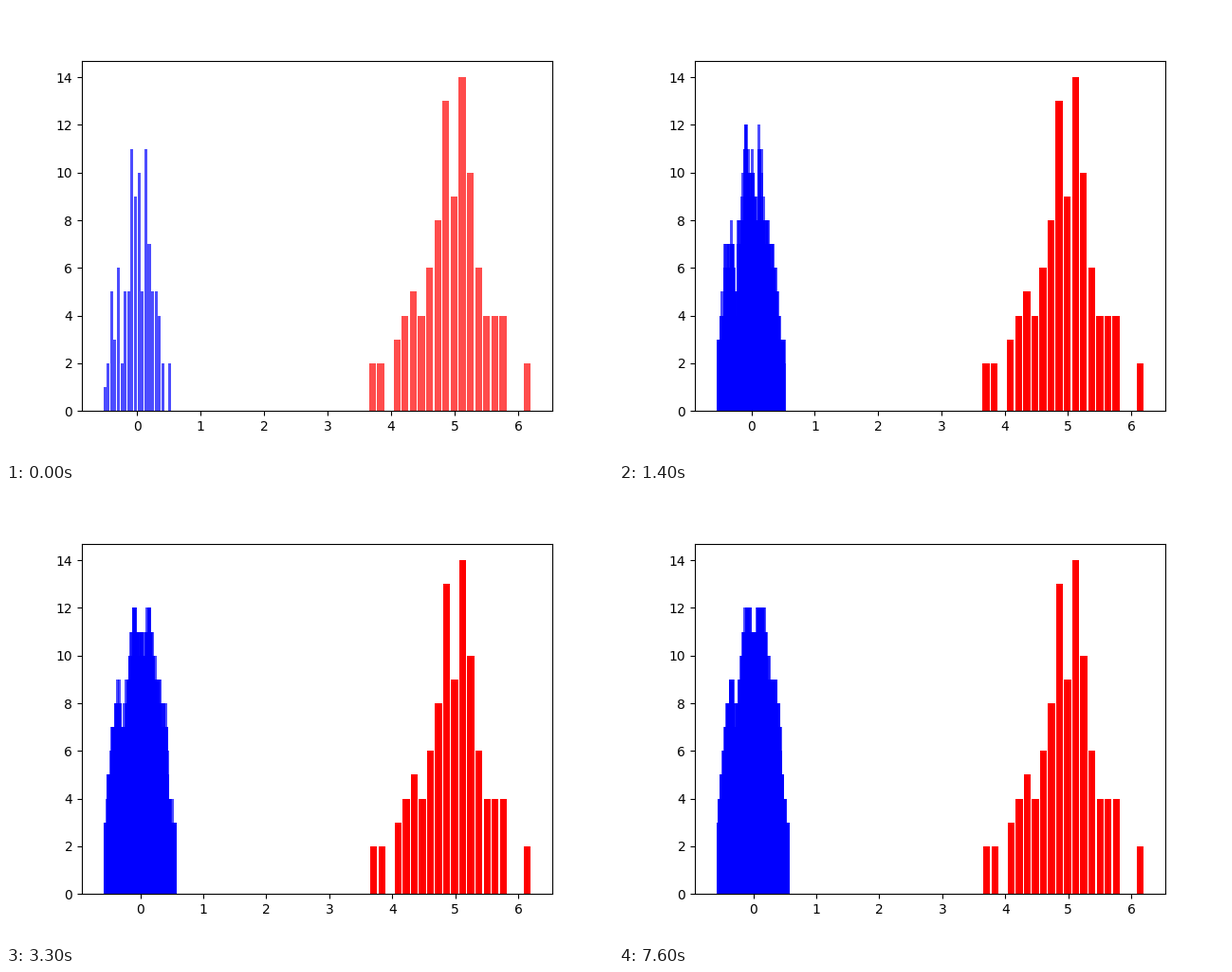
These frames come from a looping animation (640x480 px, 8 s). A matplotlib script:

```python
import matplotlib.pyplot as plt
import numpy as np
from matplotlib.animation import FuncAnimation
from matplotlib.collections import PolyCollection

FRAMES, INTERVAL = 80, 100
ALPHA = 0.7
BAR_SHARE = 0.85         # part of each bin that its bar fills
RED_START, RED_END = 3.651, 6.2
STEP = 0.0135            # bin edges wander in quarters of a bin

RED = np.array([2, 2, 0, 3, 4, 5, 4, 6, 8, 13, 9, 14, 10, 6, 4, 4, 4, 0, 0, 2])
BLUE = np.array([1, 2, 5, 3, 6, 2, 5, 5, 11, 9, 10, 5, 11, 7, 5, 5, 4, 2, 0, 2])

# Outline that the piled-up blue histograms grow towards
OUTLINE_X = [-0.59, -0.44, -0.36, -0.27, -0.12, 0, 0.15, 0.23, 0.4, 0.48, 0.57]
OUTLINE_Y = [2, 7.5, 9.5, 7.5, 12.6, 11, 12.6, 10, 8.3, 4, 3]

rng = np.random.default_rng(4)
fig, ax = plt.subplots(figsize=(6.4, 4.8), dpi=100)


def bin_starts(start, end, count):
    """Left edges of bars whose last one ends exactly at end."""
    return start + np.arange(count) * (end - start) / (count - 1 + BAR_SHARE)


def draw_histogram(counts, start, end, color):
    lefts = bin_starts(start, end, len(counts))
    width = (lefts[1] - lefts[0]) * BAR_SHARE
    bars = [[(x, 0), (x, n), (x + width, n), (x + width, 0)]
            for x, n in zip(lefts, counts) if n > 0]
    return ax.add_collection(
        PolyCollection(bars, facecolor=color, edgecolor="none",
                       linewidth=0, alpha=ALPHA), autolim=False)


def blue_range(frame):
    """Widest extent of the blue samples so far."""
    if frame < 1:
        return -0.534, 0.536
    return (-0.558, 0.548) if frame < 15 else (-0.588, 0.576)


def blue_histogram(frame):
    """The first histogram, drifting towards the outline with random dips."""
    left, right = blue_range(frame)
    inset_left, inset_right = rng.integers(0, min(frame, 3) + 1, 2) * STEP
    start, end = left + inset_left, right - inset_right
    growth = 1 - np.exp(-frame / 10)
    outline = np.interp(bin_starts(start, end, len(BLUE)) + 1.5 * STEP,
                        OUTLINE_X, OUTLINE_Y)
    level = BLUE + (outline - BLUE) * growth
    dips = 0.3 * growth * rng.random(len(BLUE))
    counts = np.floor(level * (1 - dips) + 0.5)
    return draw_histogram(counts, start, end, "blue")


red = draw_histogram(RED, RED_START, RED_END, "red")
blues = [blue_histogram(frame) for frame in range(FRAMES)]
ax.set_ylim(0, RED.max() * 1.05)


def update(frame):
    left = blue_range(frame)[0]
    margin = 0.05 * (RED_END - left)
    ax.set_xlim(left - margin, RED_END + margin)
    # The same red histogram is painted once more on every frame
    red.set_alpha(1 - (1 - ALPHA) ** (frame + 1))
    for i, blue in enumerate(blues):
        blue.set_visible(i <= frame)
    return []


anim = FuncAnimation(fig, update, frames=FRAMES, interval=INTERVAL,
                     init_func=lambda: update(0), repeat=True, repeat_delay=0)
plt.show()
```
